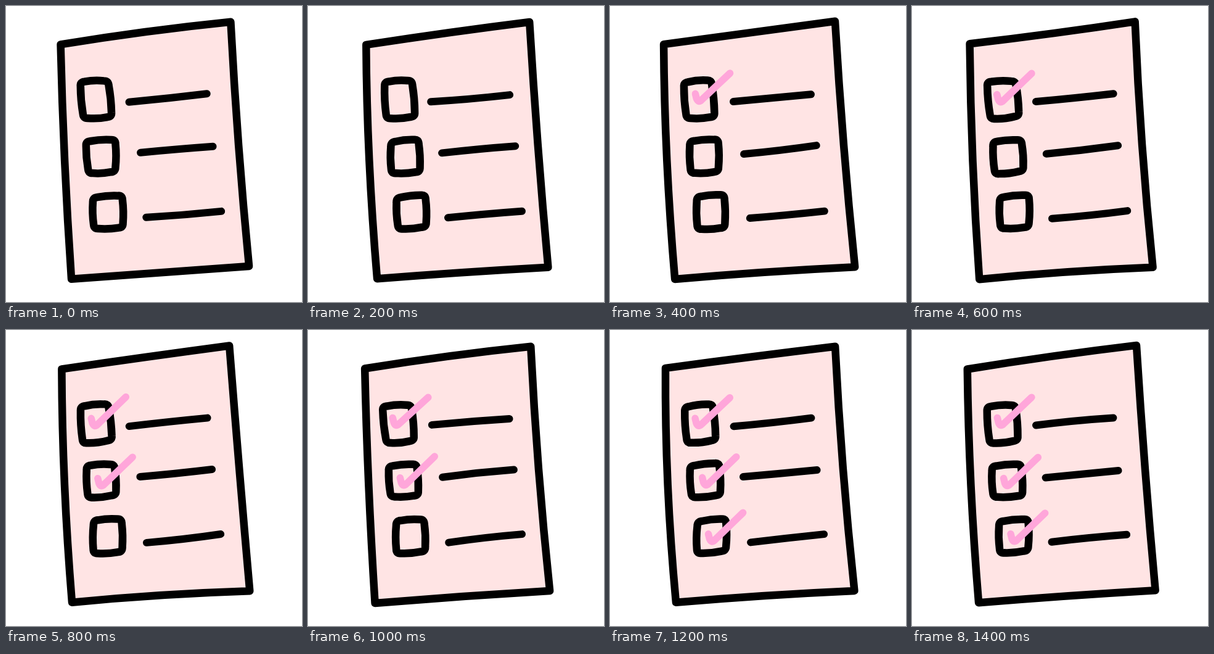
Animation, 480 px wide and 480 px high, one loop 1600 ms. Source, as an HTML page:

```html
<!DOCTYPE html>
<html lang="en">
<head>
<meta charset="utf-8">
<title>Checklist</title>
<style>
  html, body { margin: 0; width: 100%; height: 100%; overflow: hidden; background: #fff; }
  svg { display: block; width: 100%; height: 100%; }
  path { fill: none; stroke: #000; stroke-width: 12.5; stroke-linecap: round; stroke-linejoin: round; }
  .page { fill: #ffe4e4; }
  .line { stroke-width: 12; }
  .tick { stroke: #ffa6da; stroke-width: 11.5; }
</style>
</head>
<body>
<svg id="stage" viewBox="0 0 480 480"></svg>
<script>
const STEP = 200;
const stage = document.getElementById('stage');

// Corners and edge middles, clockwise from the top left
const PAGE = [[91, 62.5], [228, 43], [362.5, 26], [376, 225],
              [393, 422.5], [250, 431.5], [108, 443], [96, 250]];
const ROWS = [
  { box: [121, 124], height: 59, lean: 5, line: [200, 155], length: 127, tick: [138, 143] },
  { box: [131, 220], height: 52, lean: 2, line: [217, 239], length: 118, tick: [149, 240] },
  { box: [142, 310], height: 52, lean: 1, line: [227, 344], length: 121, tick: [160, 331] }
];
// How much wider the page is drawn at each step
const STRETCH = [1, -4, 4, -2, 1, -1, 2, 1];

let seed = 11;
const random = () => (seed = seed * 16807 % 2147483647) / 2147483647;
const wobble = (p, size = 1.3) => p.map(v => v + (random() * 2 - 1) * size);
const move = ([x, y], dx, dy) => [x + dx, y + dy];
const mix = (a, b, t) => a.map((v, i) => v + (b[i] - v) * t);
const toward = (a, b, d) => mix(a, b, d / Math.hypot(b[0] - a[0], b[1] - a[1]));

// Quadratic segment that passes through m halfway
const bend = (a, m, b) => `Q${m.map((v, i) => 2 * v - (a[i] + b[i]) / 2)} ${b}`;

function pagePath(stretch) {
  const p = PAGE.map(q => wobble(move(q, (q[0] - 240) / 130 * stretch, 0)));
  let d = `M${p[0]}`;
  for (let i = 0; i < 8; i += 2) d += bend(p[i], p[i + 1], p[(i + 2) % 8]);
  return d + 'Z';
}

// Rounded quadrilateral with slightly bulging sides
function boxPath({ box, height, lean }, stretch) {
  const a = move(box, -stretch / 2, 0), b = move(a, 46, -3.5);
  const p = [a, b, move(b, lean, height), move(a, lean, height)].map(q => wobble(q));
  const center = mix(p[0], p[2], 0.5);
  let d = '';
  p.forEach((from, i) => {
    const to = p[(i + 1) % 4], next = p[(i + 2) % 4];
    const start = toward(from, to, 7), end = toward(to, from, 7);
    const mid = mix(center, mix(from, to, 0.5), 1.04);
    d += (i ? '' : `M${start}`) + bend(start, mid, end) + `Q${to} ${toward(to, next, 7)}`;
  });
  return d + 'Z';
}

function linePath({ line, length }) {
  const a = wobble(line), b = wobble(move(line, length, -12));
  return `M${a}` + bend(a, wobble(mix(a, b, 0.5), 1), b);
}

function tickPath({ tick }) {
  const a = wobble(tick, 0.7);
  return `M${a}l2 8q3 7 8 2L${wobble(move(tick, 56, -34), 1)}`;
}

function add(parent, name, attrs) {
  const el = document.createElementNS('http://www.w3.org/2000/svg', name);
  for (const k in attrs) el.setAttribute(k, attrs[k]);
  return parent.appendChild(el);
}

const groups = STRETCH.map((stretch, i) => {
  const g = add(stage, 'g', { visibility: 'hidden' });
  const draw = (cls, d) => add(g, 'path', { class: cls, d });
  draw('page', pagePath(stretch));
  ROWS.forEach(row => {
    draw('box', boxPath(row, stretch));
    draw('line', linePath(row));
  });
  // One more tick every second step
  ROWS.slice(0, Math.floor(i / 2)).forEach(row => draw('tick', tickPath(row)));
  return g;
});

const t0 = performance.now();
let shown = -1;
function frame() {
  const now = Math.max(0, performance.now() - t0);
  const i = Math.floor(now / STEP) % groups.length;
  if (i !== shown) {
    groups.forEach((g, k) => g.setAttribute('visibility', k === i ? 'visible' : 'hidden'));
    shown = i;
  }
  requestAnimationFrame(frame);
}
frame();
</script>
</body>
</html>
```
